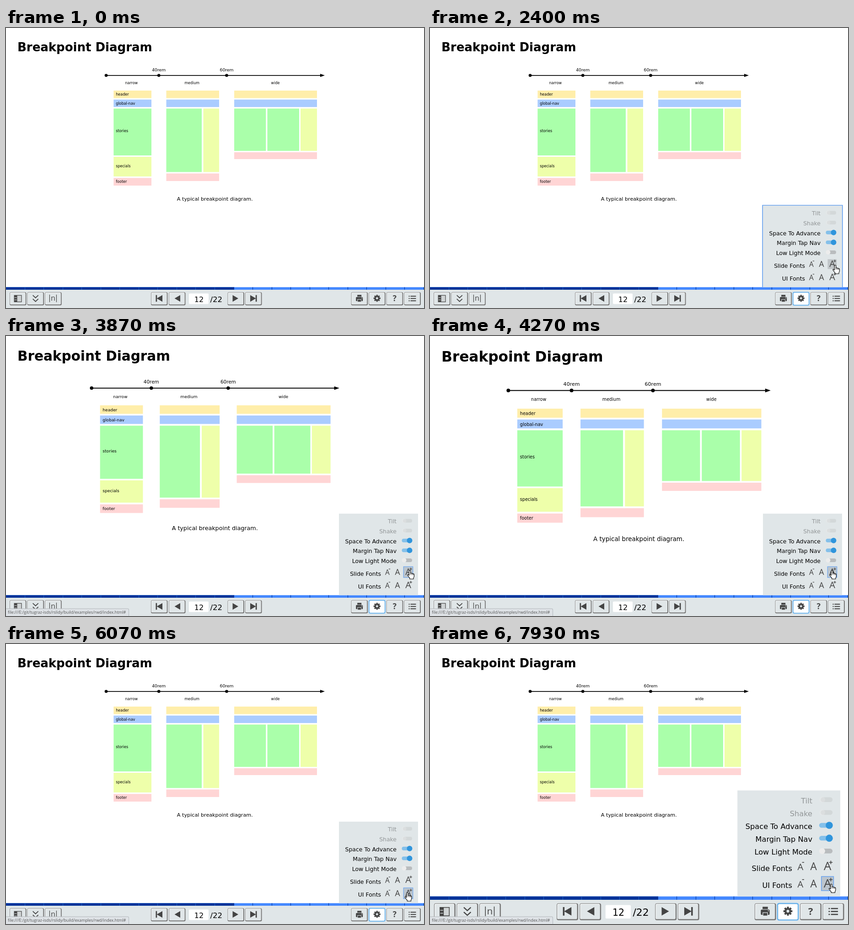
An HTML page with a canvas that plays this animation: 914x613 px, repeating every 8 s.

```html
<!DOCTYPE html>
<html lang="en">
<head>
<meta charset="utf-8">
<title>Breakpoint Diagram</title>
<style>
html, body { margin: 0; width: 100%; height: 100%; overflow: hidden; background: #fff; }
canvas { display: block; }
</style>
</head>
<body>
<canvas id="stage" width="914" height="613"></canvas>
<script>
const W = 914, H = 613, LOOP = 8000;
const ctx = document.getElementById('stage').getContext('2d');
const UI_FONT = '"DejaVu Sans", sans-serif', ICON_FONT = '"Open Sans", sans-serif';
const INK = '#444', BAR = '#e0e6e8', BLUE = '#6aa3ee';
const YELLOW = '#ffeeaa', SKY = '#aaccff', GREEN = '#aaffaa', LIME = '#eeffaa', PINK = '#ffd5d5';

// CSS "ease": cubic-bezier(.25, .1, .25, 1)
function ease(x) {
  if (x <= 0) return 0;
  if (x >= 1) return 1;
  let lo = 0, hi = 1, p;
  for (let i = 0; i < 14; i++) {
    p = (lo + hi) / 2;
    if (.75 * p * (1 - p) + p ** 3 < x) lo = p; else hi = p;
  }
  return .3 * p * (1 - p) ** 2 + 3 * p * p * (1 - p) + p ** 3;
}

// Each step is [start, target, duration]
const track = (t, base, steps) =>
  steps.reduce((v, [start, to, ms]) => v + (to - v) * ease((t - start) / ms), base);

function text(str, x, y, size, { color = '#000', align = 'left', font = UI_FONT, weight = '' } = {}) {
  ctx.font = `${weight} ${size}px ${font}`;
  ctx.fillStyle = color;
  ctx.textAlign = align;
  ctx.fillText(str, x, y);
}

// Filled rectangle given by its edges
function box(color, x1, y1, x2, y2) {
  ctx.fillStyle = color;
  ctx.fillRect(x1, y1, x2 - x1, y2 - y1);
}

function round(color, x, y, w, h, r) {
  ctx.fillStyle = color;
  ctx.beginPath();
  ctx.roundRect(x, y, w, h, r);
  ctx.fill();
}

function disc(color, x, y, r) {
  ctx.fillStyle = color;
  ctx.beginPath();
  ctx.arc(x, y, r, 0, 7);
  ctx.fill();
}

function shape(d, fill, stroke, width = 1) {
  const path = new Path2D(d);
  if (fill) { ctx.fillStyle = fill; ctx.fill(path); }
  if (stroke) { ctx.strokeStyle = stroke; ctx.lineWidth = width; ctx.stroke(path); }
}

// Draws with (px, py) moved to (x, y) and everything scaled around it
function scaled(x, y, s, px, py, draw) {
  ctx.save();
  ctx.translate(x, y);
  ctx.scale(s, s);
  ctx.translate(-px, -py);
  draw();
  ctx.restore();
}

function diagram() {
  box('#000', 219, 103, 690, 104.7);
  shape('M687 100.3L697 103.8L687 107.3Z', '#000');
  for (const x of [219, 334.2, 482.5]) disc('#000', x, 103.8, 3.3);
  const mid = { align: 'center' };
  text('40rem', 334.2, 95, 9.2, mid);
  text('60rem', 482.5, 95, 9.2, mid);
  text('narrow', 274.3, 123, 8, mid);
  text('medium', 406.7, 123, 8, mid);
  text('wide', 589, 123, 8, mid);
  for (const [l, r] of [[235.3, 318], [350.5, 466], [499, 680]]) {
    box(YELLOW, l, 137, r, 153.5);
    box(SKY, l, 156.7, r, 173);
  }
  box(GREEN, 235.3, 176.4, 318, 279);
  box(LIME, 235.3, 282, 318, 325);
  box(PINK, 235.3, 328.3, 318, 345);
  box(GREEN, 350.5, 176.4, 428, 315.3);
  box(LIME, 431.5, 176.4, 466, 315.3);
  box(PINK, 350.5, 318.5, 466, 335);
  box(GREEN, 499, 176.4, 568.3, 269);
  box(GREEN, 571.5, 176.4, 641, 269);
  box(LIME, 644, 176.4, 680, 269);
  box(PINK, 499, 272, 680, 287);
  text('header', 240.3, 148.3, 8);
  text('global-nav', 240.3, 168.3, 8);
  text('stories', 240.3, 227.8, 8);
  text('specials', 240.3, 305, 8);
  text('footer', 240.3, 339, 8);
  text('A typical breakpoint diagram.', 456.8, 378.2, 11.2, mid);
}

function slide(s) {
  scaled(25, 26.5, s, 25, 26.5, () => text('Breakpoint Diagram', 25, 51.2, 26, { weight: 'bold' }));
  scaled(457.5, 26.5, s, 457.5, 26.5, diagram);
}

const icons = {
  panel() {
    box(INK, -8.5, -8, 8.5, 7.5);
    box('#d0d4d5', -1.5, -6.8, 7.3, 6.3);
    for (const y of [-3, 2]) box(BAR, -7.5, y, -2.5, y + 1);
  },
  chevrons() { shape('M-6 -7.5L0 -2L6 -7.5M-6 .5L0 6L6 .5', null, INK, 1.8); },
  number() {
    shape('M-7.8 -9V7.5M7.2 -9V7.5', null, INK, 1.2);
    text('n', -.3, 4.5, 16, { color: INK, align: 'center', font: ICON_FONT });
  },
  first() { box(INK, -7.5, -8, -4.8, 6.5); icons.prev(); },
  prev() { shape('M-5.5 -.8L7 -8V6.5Z', INK); },
  next() { shape('M5.5 -.8L-7 -8V6.5Z', INK); },
  last() { box(INK, 4.8, -8, 7.5, 6.5); icons.next(); },
  print() {
    box(INK, -4.5, -8.5, 4.5, -4.5);
    round(INK, -7.5, -3.7, 15, 9, 1.5);
    box(BAR, -4.5, 1, 4.5, 5.5);
    box(INK, -3.5, 2, 3.5, 6.5);
    disc(BAR, 5.3, -1.7, .9);
  },
  gear() {
    ctx.save();
    ctx.translate(0, -1);
    for (let i = 0; i < 8; i++) {
      box(INK, -1.6, -7.6, 1.6, -4);
      ctx.rotate(Math.PI / 4);
    }
    ctx.restore();
    disc(INK, 0, -1, 5.6);
    disc(BAR, 0, -1, 2.4);
  },
  help() { text('?', 0, 5.5, 17, { color: INK, align: 'center', font: ICON_FONT, weight: 'bold' }); },
  list() {
    for (const y of [-6.5, -1.5, 3.5]) {
      box(INK, -8, y, -5.8, y + 2);
      box(INK, -4, y, 8, y + 2);
    }
  }
};

function button(x, icon, active) {
  ctx.save();
  ctx.translate(x, 0);
  if (active) {
    round('#b5d8f5', -19, -15.5, 38, 31, 4);
    round('#4fa3e3', -18, -14.5, 36, 29, 3);
    round('#fff', -16.7, -13.2, 33.4, 26.4, 2);
  } else {
    round('#777', -18, -14.3, 36.5, 28.8, 3);
    round('#f3f5f6', -17.2, -13.5, 33.7, 26, 2);
    round(BAR, -16, -12.3, 32.3, 24.6, 1.5);
  }
  icons[icon]();
  ctx.restore();
}

// u scales the buttons, h the height; returns the top edge
function toolbar(u, h, open) {
  const top = H - 40 * h, progress = top - 5.6 * h, cell = W / 22;
  const cy = H - 20 * h - .3;
  box('#4488ff', 0, progress, W, top);
  box('#003399', 0, progress, 12 * cell, top);
  for (let i = 1; i <= 22; i++) {
    const x = Math.round(i * cell) - 1;
    box(i < 12 ? '#2b62c4' : '#003399', x, progress, x + 1, top);
  }
  box(BAR, 0, top, W, H);
  scaled(8 + 3 * (u - 1), cy, u, 0, 0, () => {
    ['panel', 'chevrons', 'number'].forEach((icon, i) => button(18 + 38.6 * i, icon));
  });
  scaled(438.5 - 18.5 * (u - 1), cy, u, 0, 0, () => {
    button(-103.5, 'first');
    button(-64.5, 'prev');
    round('#fff', -38.5, -11.5, 43, 23, 2);
    text('12', -16.5, 7, 16, { align: 'center' });
    text('/22', 8, 7, 16.5 * h / u);
    button(64, 'next');
    button(102.5, 'last');
  });
  scaled(907 - 5 * (u - 1), cy, u, 0, 0, () => {
    ['list', 'help', 'gear', 'print'].forEach((icon, i) =>
      button(-18.5 - 38.6 * i, icon, open && icon === 'gear'));
  });
  return progress;
}

function toggle(y, on) {
  round(on ? '#84c0ea' : '#b9bcbe', on ? 865.5 : 868, y - 4, 20, 8, 4);
  disc(on ? '#3095dc' : '#ececec', on ? 882.5 : 870.5, y, on ? 6 : 5);
}

// Cells are named by row and size step, such as "slide2"
function fontRow(name, y, hover, focus) {
  [[834, 15.5, '-'], [856, 17.5, ''], [879.5, 20, '+']].forEach(([x, size, sign], i) => {
    const id = name + i;
    if (id === hover) box('#c1c6c9', x - 10, y - 11, x + 9.7, y + 10.5);
    if (id === focus) {
      if (id === hover) box('#bcc5cd', x - 10, y - 12, x + 10, y + 11);
      ctx.strokeStyle = BLUE;
      ctx.lineWidth = 1.2;
      ctx.strokeRect(x - 10.2, y - 12.2, 20.4, 23.7);
    }
    text('A', x, y + 6.2, size, { color: INK, align: 'center', font: ICON_FONT });
    if (sign) box(INK, x + 2.8, y - 7.7, x + (i ? 8.5 : 6.2), y - 6.5);
    if (i === 2) box(INK, x + 5, y - 10, x + 6.2, y - 4.2);
  });
}

function panel(p, bottom, hover, focus) {
  scaled(901 - 13 * (p - 1), bottom, p, 901, 567, () => {
    if (focus === 'panel') box(BLUE, 726.3, 387, 902.7, 567);
    box(BAR, 728, 388.5, 901, 567);
    ['Tilt', 'Shake', 'Space To Advance', 'Margin Tap Nav', 'Low Light Mode'].forEach((label, i) => {
      const y = 404 + 21.65 * i;
      ctx.globalAlpha = i < 2 ? .35 : 1;
      text(label, 854, y + 6, 12.45, { align: 'right' });
      toggle(y, i === 2 || i === 3);
    });
    ctx.globalAlpha = 1;
    text('Slide Fonts', 820, 524.3, 12.45, { align: 'right' });
    text('UI Fonts', 820, 553, 12.45, { align: 'right' });
    fontRow('slide', 516.8, hover, focus);
    fontRow('ui', 545.7, hover, focus);
  });
}

function statusBar() {
  round('#b3b8bc', -4, 596.5, 273, 22, 3);
  round('#dee2e6', -4, 597.5, 272, 22, 2);
  text('file:///E:/git/tugraz-isds/rslidy/build/examples/rwd/index.html#', 4, 608, 8.9,
    { color: '#555', font: ICON_FONT });
}

function hand(x, y) {
  ctx.save();
  ctx.translate(x, y);
  ctx.lineJoin = 'round';
  shape('M-1.6 11V1.2Q0 -1.2 1.6 1.2V6.5Q3.6 5.2 4.6 7Q6.4 6 7.2 7.8Q9.2 7 9.4 9.4V13' +
    'Q9.2 15 8 16.5V19H-.2V17Q-3 14 -5 10.8Q-5.2 8.6 -3.4 9.3Z', '#fff', '#000', 1.1);
  shape('M1.6 6.5V10M4.6 7V10.3M7.2 7.8V10.6', null, '#000', .8);
  ctx.restore();
}

// Value of the latest [start, value] that has begun
const latest = (t, list) => list.reduce((v, [start, value]) => t >= start ? value : v, null);

function draw(t) {
  const open = t >= 1365;
  const fontSize = track(t, 1.5, [[2940, 1.6, 300], [3404, 1.7, 300], [3900, 1.8, 300], [4805, 1.5, 300]]);
  const u = 1 + .95 * track(t, 0, [[6210, .1, 300], [7035, .2, 300], [7600, .3, 300]]);
  const h = 1 + 1.08 * track(t, 0, [[6210, .1, 60], [7035, .2, 60], [7600, .3, 60]]);
  const p = latest(t, [[0, 1], [6125, 1.1], [7035, 1.2], [7600, 1.3]]);
  const hover = latest(t, [[2270, 'slide2'], [4700, 'slide1'], [5570, ''], [5720, 'ui2']]);
  const focus = latest(t, [[1365, 'panel'], [2900, 'slide2'], [4800, 'slide1'], [6060, 'ui2']]);

  box('#fff', 0, 0, W, H);
  slide(fontSize / 1.5);
  const bottom = toolbar(u, h, open);
  if (open) panel(p, bottom, hover, focus);
  if (t >= 2860) statusBar();
  if (t >= 1000) {
    hand(
      track(t, 806, [[980, 809, 130], [1700, 886, 680], [3840, 879, 120], [4660, 853, 70], [5500, 877.5, 300]]),
      track(t, 604, [[980, 592, 130], [1700, 519, 680], [2480, 513, 200], [5500, 544, 300], [6500, 525.5, 400]])
    );
  }
}

function frame() {
  draw(performance.now() % LOOP);
  requestAnimationFrame(frame);
}
frame();
</script>
</body>
</html>
```
